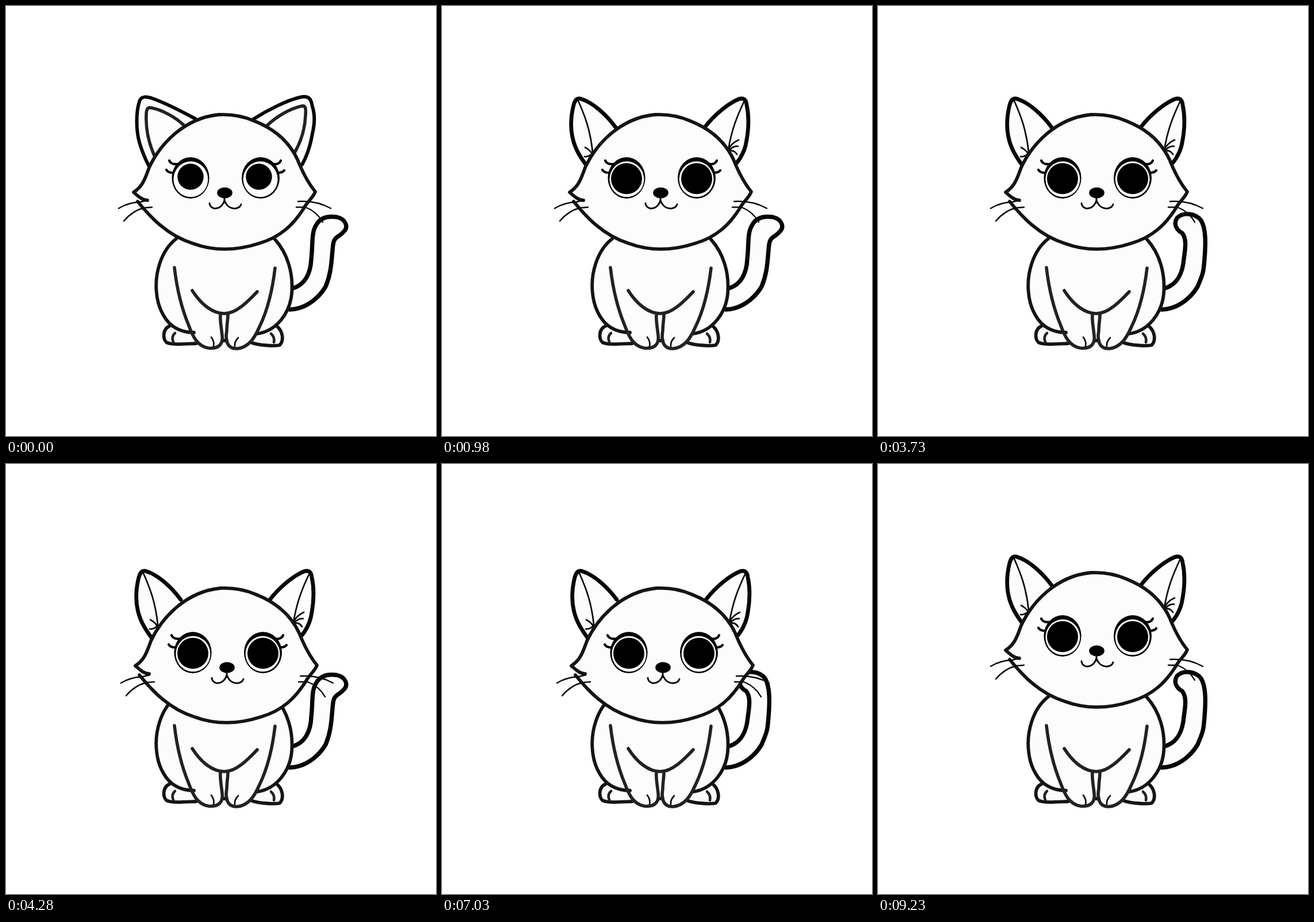
Recreate the animation shown at these times as an HTML page. Size 748 by 748 pixels, loop 9.78 s.

```html
<!DOCTYPE html>
<html lang="en">
<head>
<meta charset="utf-8">
<title>Sitting cat</title>
<style>
  html, body { margin: 0; width: 100%; height: 100%; overflow: hidden; background: #fff; }
  svg { display: block; width: 100vw; height: 100vh; }
  path { stroke-linecap: round; stroke-linejoin: round; }
  .tail { fill: #fcfcfc; stroke: #050505; stroke-width: 7.4; }
  .skin { fill: #fcfcfc; stroke: none; }
  .line { fill: none; stroke: #141414; stroke-width: 5.8; }
  .soft { fill: none; stroke: #222; stroke-width: 5.6; }
  .ear { fill: #fcfcfc; stroke: #060606; stroke-width: 6.8; }
  .thin { fill: none; stroke: #0a0a0a; stroke-width: 2.7; }
  .lash { fill: none; stroke: #000; stroke-width: 4.2; }
  .white { fill: #fcfcfc; }
</style>
</head>
<body>
<svg viewBox="0 0 748 748">
  <path id="tailOut" class="tail" d="M499 491C520 485 530 465 531 440C534 415 531 395 539 382C546 368 560 365 575 367C592 371 596 385 587 393C580 402 571 400 569 415C566 440 567 462 556 488C543 510 520 527 494 528"/>
  <path id="tailIn" class="tail" d="M499 491C520 485 530 465 532 440C535 420 537 404 529 395C518 389 514 378 520 369C530 358 552 360 562 373C571 388 570 415 568 440C566 462 567 462 556 488C543 510 520 527 494 528"/>

  <g id="body">
    <path class="skin" d="M296 405C270 425 258 465 262 500C265 530 280 552 284 557C273 562 272 588 290 588L478 590C484 582 482 565 472 556C490 545 497 520 497 500C500 465 490 430 467 405Z"/>
    <path class="line" d="M296 405C270 425 258 465 262 500C265 530 280 552 295 560C305 566 315 568 327 568M467 405C490 430 500 465 497 500C494 535 470 565 438 570"/>
    <path class="line" d="M284 557C273 562 272 578 279 585C287 590 310 588 331 587M470 556C482 565 484 582 476 590C465 592 440 590 428 586M376 582L384 582"/>
    <path class="soft" d="M293 455C297 490 305 525 318 556C325 575 333 592 352 595C370 597 378 588 376 573C374 555 372 545 373 538M468 456C464 490 455 530 440 560C432 578 422 594 402 596C385 597 381 582 384 565C384 555 386 545 386 537"/>
    <path class="soft" d="M324 495C340 520 360 535 380 535C400 535 420 515 437 497"/>
    <path class="soft" style="stroke-width:4.6" d="M294 569Q287 575 291 584M461 570Q468 576 466 585"/>
    <path class="thin" d="M357 576Q363 584 361 592M404 577Q397 584 398 592"/>
  </g>

  <g id="ears">
    <g id="earsRound">
      <path class="ear" style="stroke-width:6" d="M329 196C305 183 280 170 258 162C245 157 235 156 232 166C226 185 226 215 232 237C238 258 245 272 251 283M430 197C455 181 490 163 515 158C528 156 531 163 533 175C538 190 537 205 533 222C529 245 523 262 515 276"/>
      <path class="soft" d="M311 209C295 193 270 180 252 177C246 176 244 180 244 190C243 215 249 240 258 260M452 210C470 192 495 178 515 174C521 173 522 178 521 190C520 215 512 238 502 255"/>
    </g>
    <g id="earsSharp">
      <path class="ear" d="M302 211C285 188 262 168 243 162C236 159 232 162 229 172C222 200 224 225 232 245C238 260 246 270 251 277M457 211C473 190 497 170 516 162C525 159 529 163 530 172C535 195 533 220 528 243C524 258 517 268 511 275"/>
      <path class="thin" d="M237 165C248 190 258 215 262 254M249 246Q257 250 262 258M248 262Q255 263 262 256M526 165C513 192 504 215 498 250M498 250Q504 238 516 233M499 252Q506 243 515 244M500 252Q508 250 513 258"/>
    </g>
  </g>

  <g id="head">
    <path class="skin" d="M222 324C238 314 242 300 249 281C268 240 310 195 370 189C392 188 412 191 432 200C465 213 492 235 507 267C515 287 524 306 538 323C534 334 524 340 518 352C500 380 478 402 440 413C400 426 360 426 325 413C280 399 250 366 229 340Z"/>
    <path class="line" d="M246 338C237 338 230 331 222 324C238 314 242 300 249 281C268 240 310 195 370 189C392 188 412 191 432 200C465 213 492 235 507 267C515 287 524 306 538 323C534 334 524 340 518 352C500 380 478 402 440 413C400 426 360 426 325 413C280 399 250 366 229 340"/>
  </g>

  <g id="face">
    <ellipse cx="321" cy="299" rx="32.6" ry="36"/>
    <ellipse cx="443" cy="299" rx="33" ry="36"/>
    <ellipse class="white" cx="321.4" cy="301.3" rx="30" ry="31"/>
    <ellipse class="white" cx="442.6" cy="301.3" rx="30" ry="31"/>
    <g id="pupilsSmall">
      <circle cx="321" cy="297" r="22.7"/>
      <circle cx="440" cy="297" r="22.7"/>
    </g>
    <g id="pupilsBig">
      <circle cx="321" cy="300.3" r="27"/>
      <circle cx="443" cy="300.3" r="27"/>
    </g>
    <path class="lash" d="M279 285Q282 290 290 290M284 269Q287 276 298 275M484 286Q481 290 473 290M478 269Q475 276 466 275"/>
    <ellipse cx="380.5" cy="325" rx="13.3" ry="9.5"/>
    <path class="thin" style="stroke-width:3" d="M380 333L380 338C377 348 370 353 362 352C357 351 354 347 354 343M380 338C384 349 392 353 400 352C406 351 408 348 409 345"/>
    <path class="thin" style="stroke-width:2.4" d="M196 352Q212 342 233 341L246 338M205 374Q220 356 241 351L254 350M508 340Q540 338 565 352M505 350L521 350Q541 358 551 376"/>
  </g>
</svg>
<script>
  const LOOP = 9780;
  const BEAT = 550;
  const tailTimes = [0, 220, 440, 710];
  for (let t = 980; t < LOOP; t += BEAT) tailTimes.push(t);

  const pupilsGrow = 440, earsChange = 980, headDrop = 4280, headLift = 7580;
  // The parts of the head sink by slightly different amounts.
  const drops = { ears: [2, 25], head: [3, 27], face: [4, 29] };

  const el = id => document.getElementById(id);
  const show = (id, on) => el(id).setAttribute("visibility", on ? "visible" : "hidden");

  function swap(a, b, first) {
    show(a, first);
    show(b, !first);
  }

  function draw(t) {
    const swings = tailTimes.filter(s => s <= t).length;
    swap("tailOut", "tailIn", swings % 2 === 1);
    swap("pupilsSmall", "pupilsBig", t < pupilsGrow);
    swap("earsRound", "earsSharp", t < earsChange);
    const low = t >= headDrop && t < headLift;
    for (const [id, [x, y]] of Object.entries(drops))
      el(id).setAttribute("transform", low ? `translate(${x} ${y})` : "");
  }

  const start = performance.now();
  function tick() {
    draw((performance.now() - start) % LOOP);
    requestAnimationFrame(tick);
  }
  tick();
</script>
</body>
</html>
```
